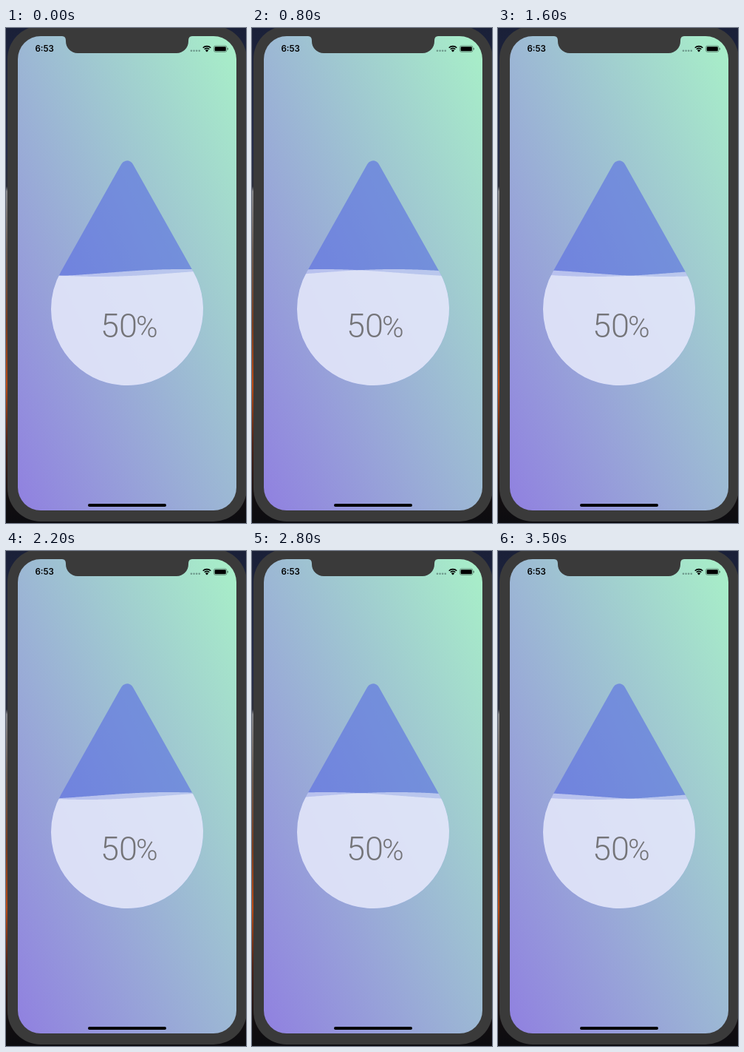
Write an HTML page with a canvas that moves like this. It is 325x669 px and loops after 3600 ms.

```html
<!DOCTYPE html>
<html lang="en">
<head>
<meta charset="utf-8">
<title>Water level</title>
<style>
html, body { margin: 0; width: 100%; height: 100%; overflow: hidden; background: #101014; }
canvas, svg { position: absolute; left: 0; top: 0; width: 325px; height: 669px; }
.clock { font: 600 11.5px Inter, sans-serif; fill: #000; }
.level { font: 300 45px Roboto, Lato, sans-serif; fill: #747478; }
.sign { font-size: 40px; }
</style>
</head>
<body>
<canvas id="stage" width="325" height="669"></canvas>
<svg viewBox="0 0 325 669">
  <text class="clock" x="39.5" y="32">6:53</text>
  <text class="level" x="128" y="418">50<tspan class="sign" dx="-2">%</tspan></text>
</svg>
<script>
const ctx = document.getElementById('stage').getContext('2d');
const LOOP = 3600, STEP = 100;
const WAVE = { length: 412, height: 5, level: 331, gap: 95 };
const SCREEN = { x: 16, y: 11, w: 296, h: 641 };

// [time, midpoint between the two crests]
const DRIFT = [[0, 285], [400, 217], [1100, 90], [1600, -27],
               [2200, -144], [2800, -264], [3500, -439]];

function drift(t) {
  let i = 1;
  while (i < DRIFT.length - 1 && t > DRIFT[i][0]) i++;
  const [t0, a] = DRIFT[i - 1], [t1, b] = DRIFT[i];
  return a + (b - a) * Math.min(1, (t - t0) / (t1 - t0));
}

function ramp(x0, y0, x1, y1, stops) {
  const g = ctx.createLinearGradient(x0, y0, x1, y1);
  stops.forEach(([at, color]) => g.addColorStop(at, color));
  return g;
}

function box(x, y, w, h, r, fill) {
  ctx.beginPath();
  ctx.roundRect(x, y, w, h, r);
  ctx.fillStyle = fill;
  ctx.fill();
}

function backdrop() {
  ctx.fillStyle = ramp(0, 0, 0, 669, [
    [0, '#1a2038'], [0.25, '#232a48'], [0.32, '#2a2c38'], [0.33, '#85868a'],
    [0.45, '#6a5a50'], [0.6, '#7a3c1c'], [0.72, '#b84a14'],
    [0.84, '#4a2014'], [0.95, '#120e10'], [1, '#0c0c10']]);
  ctx.fillRect(0, 0, 325, 669);
  box(2, -3, 324, 670, 45, '#3a3a3a');
}

function screen() {
  const { x, y, w, h } = SCREEN;
  const cx = x + w / 2, cy = y + h / 2;
  const k = w * h / (w * w + h * h);
  const dx = h * k, dy = w * k;
  // equal colours run parallel to the falling diagonal
  const fill = ramp(cx - dx, cy + dy, cx + dx, cy - dy, [[0, '#9080e0'], [1, '#a8f0c8']]);
  box(x, y, w, h, 31, fill);
}

function notch() {
  ctx.beginPath();
  ctx.moveTo(76, 10);
  ctx.lineTo(76, 11);
  ctx.quadraticCurveTo(81, 11, 81, 17);
  ctx.arcTo(81, 34, 98, 34, 16);
  ctx.arcTo(247, 34, 247, 17, 16);
  ctx.lineTo(247, 17);
  ctx.quadraticCurveTo(247, 11, 252, 11);
  ctx.lineTo(252, 10);
  ctx.fillStyle = '#3a3a3a';
  ctx.fill();
}

function statusIcons() {
  for (let i = 0; i < 4; i++) box(249.7 + i * 3.6, 29.4, 2.5, 2.5, 1.2, 'rgba(70,100,95,.6)');
  ctx.strokeStyle = '#000';
  ctx.lineWidth = 1.6;
  for (const r of [7.4, 4.6]) {
    ctx.beginPath();
    ctx.arc(272, 32, r, -Math.PI * 0.75, -Math.PI * 0.25);
    ctx.stroke();
  }
  ctx.beginPath();
  ctx.moveTo(272, 32.4);
  ctx.arc(272, 32.4, 3, -Math.PI * 0.75, -Math.PI * 0.25);
  ctx.fillStyle = '#000';
  ctx.fill();
  ctx.strokeStyle = 'rgba(0,0,0,.45)';
  ctx.lineWidth = 0.8;
  ctx.beginPath();
  ctx.roundRect(281.4, 24, 17.6, 8.4, 2.4);
  ctx.stroke();
  box(282.6, 25.2, 15.2, 6, 1.3, '#000');
  box(299.7, 26.8, 1.2, 2.8, 0.6, 'rgba(0,0,0,.5)');
}

function dropPath() {
  const tilt = 29.4 * Math.PI / 180;
  ctx.beginPath();
  ctx.arc(164, 380, 103, -tilt, Math.PI + tilt);
  ctx.arc(164, 188.3, 9, Math.PI + tilt, -tilt);
  ctx.closePath();
}

function water(crest) {
  const k = 2 * Math.PI / WAVE.length;
  ctx.beginPath();
  ctx.moveTo(60, 490);
  for (let x = 60; x <= 268; x += 2) {
    ctx.lineTo(x, WAVE.level - WAVE.height * Math.cos(k * (x - crest)));
  }
  ctx.lineTo(268, 490);
  ctx.fillStyle = 'rgba(255,255,255,.5)';
  ctx.fill();
}

function drop(t) {
  const mid = drift(t);
  dropPath();
  ctx.fillStyle = 'rgba(88,108,227,.6)';
  ctx.fill();
  ctx.save();
  ctx.clip();
  water(mid - WAVE.gap / 2);
  water(mid + WAVE.gap / 2);
  ctx.restore();
}

function draw(t) {
  backdrop();
  screen();
  notch();
  statusIcons();
  drop(t);
  box(111, 643, 106, 4, 2, '#000');
}

const start = performance.now();
function tick() {
  const t = (performance.now() - start) % LOOP;
  draw(Math.floor(t / STEP) * STEP);
  requestAnimationFrame(tick);
}
tick();
</script>
</body>
</html>
```
